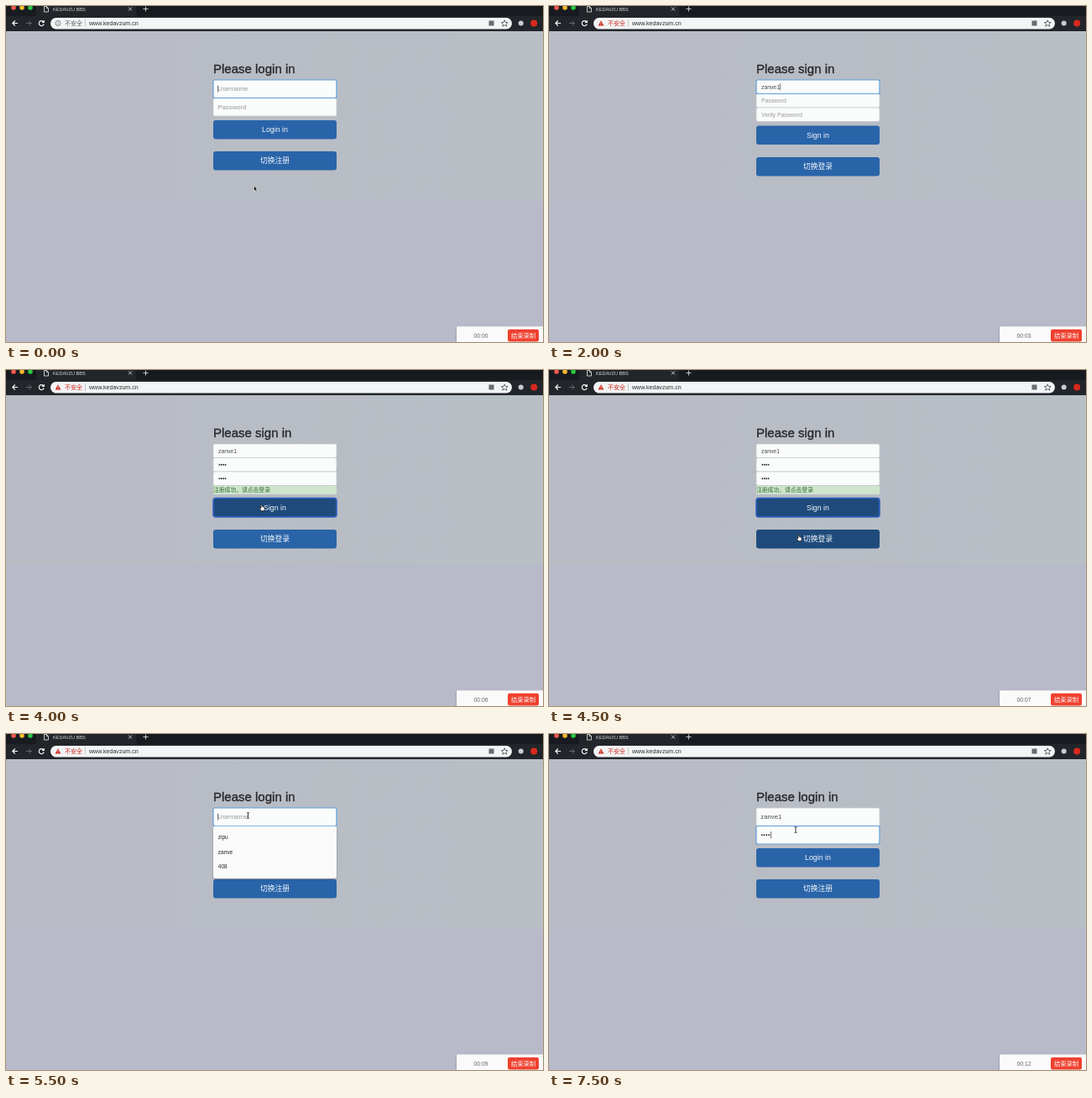
Recreate the animation shown at these times as an HTML page. Size 640 px wide and 400 px high, loop 8000 ms.

```html
<!DOCTYPE html>
<html lang="zh-CN">
<head>
<meta charset="utf-8">
<title>Login demo</title>
<style>
html, body { margin: 0; width: 100%; height: 100%; overflow: hidden; background: #b9bbc8; }
svg { display: block; width: 640px; height: 400px; }
text { font-family: "Liberation Sans", "Noto Sans CJK SC", "Noto Sans CJK", sans-serif; white-space: pre; }
</style>
</head>
<body>
<svg viewBox="0 0 640 400">
  <defs>
    <linearGradient id="sky"><stop stop-color="#b9bbc5"/><stop offset="1" stop-color="#b8bfc5"/></linearGradient>
    <filter id="shade" x="-10%" y="-20%" width="120%" height="150%">
      <feDropShadow dx="0" dy="1" stdDeviation="1" flood-opacity=".35"/>
    </filter>
  </defs>
  <rect width="640" height="400" fill="#b9bac9"/>
  <rect y="30" width="640" height="202" fill="url(#sky)"/>

  <rect width="640" height="30" fill="#22262a"/>
  <path d="M0 0H36V9Q36 12 33 12H0ZM155 0H640V12H158Q155 12 155 9Z" fill="#171b1f"/>
  <circle cx="9" cy="2" r="2.8" fill="#f4574f"/>
  <circle cx="19" cy="2" r="2.8" fill="#f5b82e"/>
  <circle cx="29" cy="2" r="2.8" fill="#2bc840"/>
  <g fill="none" stroke="#d5d7d9" stroke-width=".9">
    <path d="M45.5 .5H48.5L50.5 2.5V7H45.5ZM48.3 .5V2.7H50.5"/>
    <path d="M146 1.5L150 5.5M150 1.5L146 5.5M163.5 3.5H169.5M166.5 .5V6.5"/>
    <path d="M14 20.5H8M10.8 17.5L7.8 20.5L10.8 23.5" stroke="#fff" stroke-width="1.1"/>
    <path d="M24 20.5H30M27.2 17.5L30.2 20.5L27.2 23.5" stroke="#6d7175"/>
    <path d="M44.7 18.8A3 3 0 1 0 45.2 21.3M45.3 17V19.4H42.9" stroke="#fff" stroke-width="1.1"/>
  </g>
  <text x="56" y="5.6" font-size="5.6" fill="#d8dadc">KEDAVZU BBS</text>
  <rect x="53" y="14" width="550" height="13.5" rx="6.7" fill="#f3f4f5"/>
  <path d="M94.5 16.5V24.5" stroke="#b5b7ba" stroke-width=".8"/>
  <text x="99" y="23.2" font-size="7.1" fill="#2b2d30">www.kedavzum.cn</text>
  <rect x="575.5" y="17.5" width="6" height="6" fill="#686c70"/>
  <path d="M594.2 16.8L595.3 19.4L598.1 19.6L596 21.4L596.7 24.2L594.2 22.7L591.7 24.2L592.4 21.4L590.3 19.6L593.1 19.4Z" fill="none" stroke="#55585c" stroke-width=".9"/>
  <circle cx="613.7" cy="20.5" r="3" fill="#c9ccd0"/>
  <circle cx="629.2" cy="20.5" r="4" fill="#d8281f"/>

  <g id="view"></g>

  <rect x="537" y="381.5" width="106" height="22" rx="1.5" fill="#fafafa" filter="url(#shade)"/>
  <text id="clock" x="566" y="395.2" font-size="6.8" fill="#66686c" text-anchor="middle"></text>
  <rect x="598" y="385" width="37" height="14.5" rx="2" fill="#f0412f"/>
  <text x="616.5" y="395.1" font-size="7.3" fill="#fff" text-anchor="middle">结束录制</text>
</svg>
<script>
const STEP = 500, LOOP = 8000, LEFT = 247, WIDTH = 147;
const view = document.getElementById('view'), clock = document.getElementById('clock');
const names = ['zipu', 'zanve', '408'];

const login = { heading: 'Please login in', labels: ['Username', 'Password'], edges: [88, 109.5, 131],
  size: 7.8, pad: 5.3, action: 'Login in', swap: '切换注册', buttons: [136, 173] };
const signup = { heading: 'Please sign in', labels: ['Username', 'Password', 'Verify Password'], edges: [88, 104.5, 121, 137.5],
  size: 6.8, pad: 6, action: 'Sign in', swap: '切换登录', buttons: [142.5, 180] };

// values: field contents; focus: field index; pointer: [kind, x, y]
const steps = [
  { form: login, focus: 0, pointer: ['arrow', 295.5, 214] },
  { form: signup, hover: true, pointer: ['hand', 298, 187] },
  { form: signup, focus: 0, list: names, pointer: ['beam', 281, 94] },
  { form: signup, focus: 0, values: ['zan'], list: ['zanve'] },
  { form: signup, focus: 0, values: ['zanve1'] },
  { form: signup, focus: 1, values: ['zanve1'] },
  { form: signup, focus: 1, values: ['zanve1', 3] },
  { form: signup, focus: 2, values: ['zanve1', 4, 2] },
  { form: signup, pressed: true, values: ['zanve1', 4, 4], pointer: ['hand', 305, 164] },
  { form: signup, pressed: true, hover: true, values: ['zanve1', 4, 4], pointer: ['hand', 298, 200] },
  { form: login, hover: true, pointer: ['hand', 297, 184] },
  { form: login, focus: 0, list: names, pointer: ['beam', 288.5, 97] },
  { form: login, focus: 0, values: ['zan'], list: ['zanve'] },
  { form: login, focus: 0, values: ['zanve1'] },
  { form: login, focus: 1, values: ['zanve1'], pointer: ['beam', 294, 114] },
  { form: login, focus: 1, values: ['zanve1', 4], pointer: ['beam', 294, 114] }
];

const text = (x, y, size, fill, str, more = '') =>
  `<text x="${x}" y="${y}" font-size="${size}" fill="${fill}" ${more}>${str}</text>`;
const box = (y, h, fill, more = '') =>
  `<rect x="${LEFT}" y="${y}" width="${WIDTH}" height="${h}" fill="${fill}" ${more}/>`;

const pointers = {
  arrow: '<path d="M0 0V6.3L1.4 5L2.4 7.3L3.4 6.8L2.4 4.6H4.3Z" fill="#111" stroke="#fff" stroke-width=".5"/>',
  beam: '<path d="M-1.5 -3.5Q0 -3.5 0 -2.5Q0 -3.5 1.5 -3.5M0 -2.5V2.5M-1.5 3.5Q0 3.5 0 2.5Q0 3.5 1.5 3.5" fill="none" stroke="#222" stroke-width=".9"/>',
  hand: '<path d="M-1.3 -3.5Q-.6 -4.3 0 -3.3L.5 -1.4L3 -.7Q3.7 1.5 2.7 3.8H-.7L-3 .6Q-2.6 -.4 -1 .6Z" fill="#fff" stroke="#111" stroke-width=".8"/>'
};

function security(warn) {
  const color = warn ? '#cb2b20' : '#5c6064';
  const icon = warn
    ? `<path d="M62 17.2L65.4 23.6H58.6Z" fill="${color}"/><path d="M62 19.4V21.5M62 22.2V22.9" stroke="#fff" stroke-width=".7"/>`
    : `<circle cx="62" cy="20.5" r="3" fill="none" stroke="${color}" stroke-width=".8"/><path d="M62 18.8V19.5M62 20.2V22.2" stroke="${color}" stroke-width=".8"/>`;
  return icon + text(70, 23.2, 7, color, '不安全');
}

function field(form, i, value, focused) {
  const top = form.edges[i], h = form.edges[i + 1] - top, mid = top + h / 2, x = LEFT + form.pad;
  let out = box(top, h, '#fafbfb', `rx="2" stroke="${focused ? '#5f9fdc' : '#c5c7ca'}" stroke-width="${focused ? 1.2 : .7}"`);
  let end = x;
  if (typeof value === 'number') {
    const gap = form === login ? 2.8 : 2.4;
    for (let n = 0; n < value; n++) out += `<circle cx="${x + 1.4 + n * gap}" cy="${mid}" r=".9" fill="#26282b"/>`;
    end += value * gap + .6;
  } else {
    out += text(x, mid + form.size * .35, form.size, value ? '#4b4e52' : '#97999c', value || form.labels[i], value ? 'class="typed"' : '');
  }
  if (focused) out += `<path class="caret" d="M${end + .4} ${mid - 4}V${mid + 4}" stroke="#333" stroke-width=".7"/>`;
  return out;
}

function button(y, label, dark, ring) {
  return box(y, 22.5, dark ? '#1f4b7c' : '#2964a9', `rx="3" ${ring ? 'stroke="#2f62c4" stroke-width="1.6"' : ''}`) +
    text(LEFT + WIDTH / 2, y + 14.3, 8.8, '#f4f7fa', label, 'text-anchor="middle"');
}

function dropdown(y, rows) {
  return box(y, 27 + 17.5 * (rows.length - 1), '#fafafa', 'rx="2" filter="url(#shade)"') +
    rows.map((row, i) => text(252.8, y + 15.6 + i * 17.5, 6.5, '#222427', row)).join('');
}

function draw(index) {
  const s = steps[index], form = s.form, values = s.values || [], shift = s.pressed ? 10 : 0;
  let out = security(index > 2);
  out += text(LEFT, 80, 15, '#26282b', form.heading, 'stroke="#26282b" stroke-width=".35"');
  form.labels.forEach((_, i) => { if (i !== s.focus) out += field(form, i, values[i]); });
  if (s.focus >= 0) out += field(form, s.focus, values[s.focus], true);
  if (s.pressed) out += box(138, 10, '#cfe5cb') + text(LEFT, 145.4, 6.8, '#2f6a33', '注册成功，请点击登录');
  out += button(form.buttons[0] + shift, form.action, s.pressed, s.pressed);
  out += button(form.buttons[1] + shift, form.swap, s.hover);
  if (s.list) out += dropdown(form.edges[1] + .3, s.list);
  if (s.pointer) {
    const [kind, x, y] = s.pointer;
    out += `<g transform="translate(${x} ${y})">${pointers[kind]}</g>`;
  }
  view.innerHTML = out;

  // place the caret after the typed text
  const typed = view.querySelector('.typed'), caret = view.querySelector('.caret');
  if (s.focus === 0 && typed) caret.setAttribute('transform', `translate(${typed.getComputedTextLength()} 0)`);

  const seconds = Math.max(0, Math.floor(index * STEP / 1000 * 1.75 - .3));
  clock.textContent = '00:' + String(seconds).padStart(2, '0');
}

let shown = -1;
const start = performance.now();
function tick() {
  const index = Math.floor((performance.now() - start) % LOOP / STEP);
  if (index !== shown) draw(shown = index);
  requestAnimationFrame(tick);
}
tick();
</script>
</body>
</html>
```
